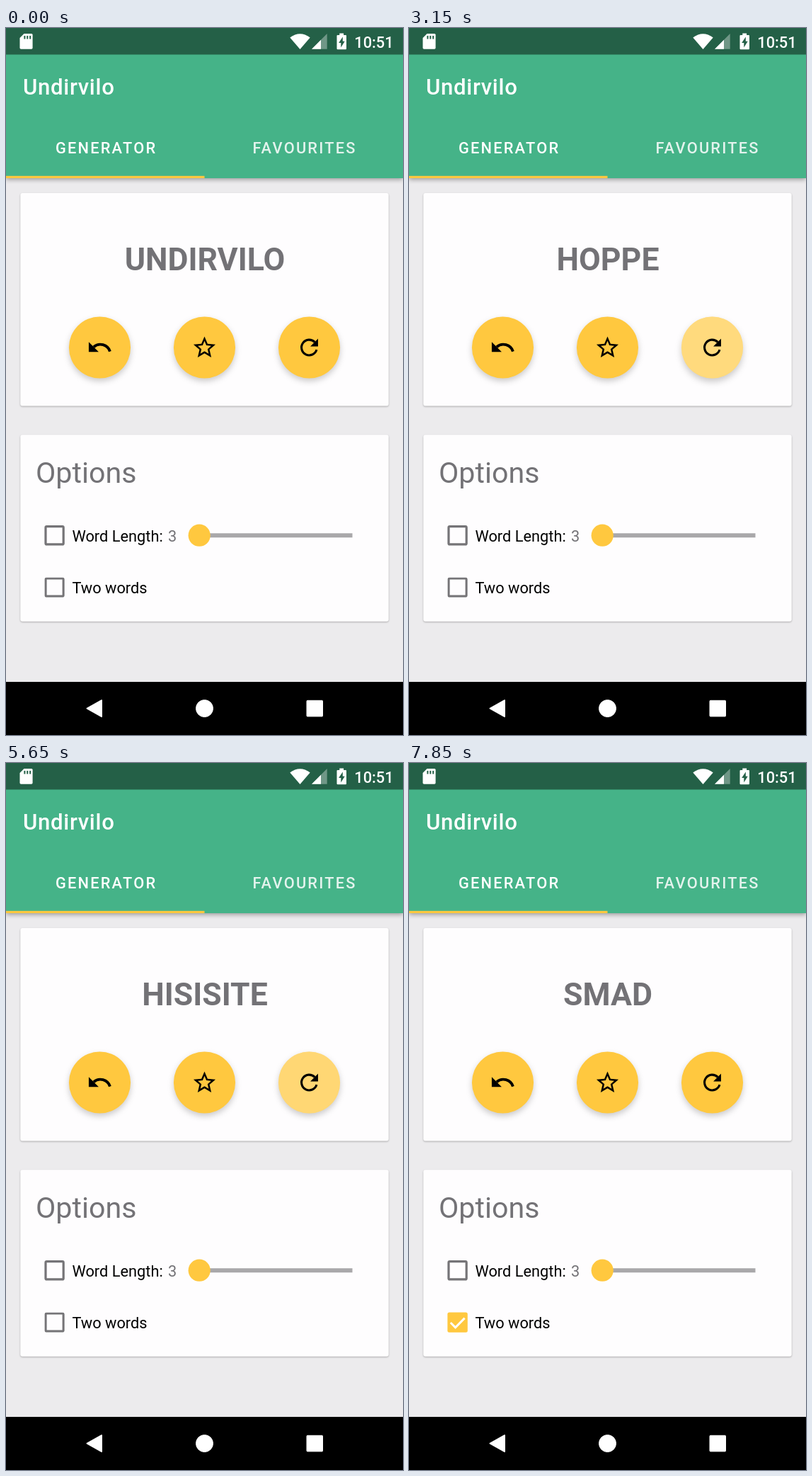
Animation, 561 px wide and 998 px high, one loop 8000 ms. Source, as an HTML page:

```html
<!DOCTYPE html>
<html lang="en">
<head>
<meta charset="utf-8">
<title>Word generator</title>
<style>
  html, body { margin: 0; width: 100%; height: 100%; overflow: hidden; background: #ecebed; }
  svg { display: block; width: 561px; height: 998px; font-family: Roboto, sans-serif; }
  .card { fill: #fefdfe; filter: drop-shadow(0 1.5px 1.2px rgba(0,0,0,.28)); }
  .bar { filter: drop-shadow(0 2px 3px rgba(0,0,0,.35)); }
  .tab { font-size: 21.8px; font-weight: 500; letter-spacing: 2.2px; text-anchor: middle; fill: #fff; }
  .label { font-size: 21.8px; }
  .fab { fill: #ffc83f; filter: drop-shadow(0 4px 4px rgba(0,0,0,.2)); }
  .line { fill: none; stroke: #000; stroke-width: 2.5; }
  .box { fill: none; stroke: #757477; stroke-width: 3.2; }
</style>
</head>
<body>
<svg viewBox="0 0 561 998">
  <defs>
    <clipPath id="disc"><circle cx="428.5" cy="451" r="43.6"/></clipPath>
    <clipPath id="tick-box"><rect x="54.4" y="775.4" width="28.4" height="28.4" rx="2.5"/></clipPath>
  </defs>
  <rect width="561" height="998" fill="#ecebed"/>

  <!-- app bar and tabs -->
  <rect class="bar" width="561" height="212" fill="#45b388"/>
  <rect width="561" height="37.5" fill="#246047"/>
  <text x="24" y="93.5" font-size="31.2" font-weight="500" letter-spacing=".65" fill="#fff">Undirvilo</text>
  <text class="tab" x="141.6" y="177">GENERATOR</text>
  <text class="tab" x="422" y="177" opacity=".85">FAVOURITES</text>
  <rect y="208.8" width="280.5" height="3.2" fill="#ffc83f"/>

  <!-- status icons -->
  <g fill="#fff">
    <path d="M25.5 8H36q1.6 0 1.6 1.6V28q0 1.8-1.6 1.8H21.2q-1.7 0-1.7-1.8V14z"/>
    <path d="M26.4 11v4.5M30.3 11v4.5M34.2 11v4.5" stroke="#246047" stroke-width="2"/>
    <path d="M401.3 13.4Q415.5 3 429.7 13.4L415.5 30z"/>
    <path d="M432 29.8h21.7V8z" opacity=".35"/>
    <path d="M432 29.8h13V16.7z"/>
    <path d="M471.3 7.5h5.8V10H480q1 0 1 1V29q0 1.2-1 1.2H468.6q-1.1 0-1.1-1.2V11q0-1 1.1-1h2.7z"/>
    <path d="M475.8 12.5l-5.6 8.5h3.1v6.5l5.4-8.8h-2.9z" fill="#246047"/>
    <text class="label" x="492.3" y="27.5" font-weight="500">10:51</text>
  </g>

  <!-- word card -->
  <rect class="card" x="20.3" y="233" width="520.4" height="300.5" rx="3"/>
  <text id="word" x="281" y="342" font-size="44.6" font-weight="700" text-anchor="middle" fill="#737276"></text>
  <circle class="fab" cx="132.5" cy="451" r="43.6"/>
  <circle class="fab" cx="280.5" cy="451" r="43.6"/>
  <circle class="fab" id="refresh" cx="428.5" cy="451" r="43.6"/>
  <circle id="ripple" cx="428.5" fill="#fff" clip-path="url(#disc)"/>
  <g transform="translate(113.8 432.3) scale(1.558)">
    <path d="M2 7v9h9z"/>
    <path class="line" d="M6.49 11.47A9.25 9.25 0 0 1 21.28 15.6"/>
  </g>
  <path transform="translate(261.8 432.3) scale(1.558)" d="M22 9.24l-7.19-.62L12 2 9.19 8.63 2 9.24l5.46 4.73L5.82 21 12 17.27 18.18 21l-1.63-7.03zM12 15.4l-3.76 2.27 1-4.28-3.32-2.88 4.38-.38L12 6.1l1.71 4.04 4.38.38-3.32 2.88 1 4.28z"/>
  <g transform="translate(409.8 432.3) scale(1.558)">
    <path d="M20 4v7h-7z"/>
    <path class="line" style="stroke-width:2" d="M18.7 14A7 7 0 1 1 16.95 7.05"/>
  </g>

  <!-- options card -->
  <rect class="card" x="20.3" y="574.3" width="520.4" height="263.5" rx="3"/>
  <text x="42" y="641.5" font-size="41.2" fill="#737276">Options</text>
  <rect class="box" x="56" y="703.7" width="25.2" height="25.2" rx="1.5"/>
  <text class="label" x="93.4" y="724.6">Word Length:</text>
  <text class="label" x="229" y="724.6" fill="#737276">3</text>
  <path d="M273 716.2H489.5" stroke="#a9a8aa" stroke-width="6"/>
  <circle cx="273.2" cy="716.2" r="15.6" fill="#ffc83f"/>
  <circle id="halo" cx="68.6" cy="789.6" fill="#ffc83f"/>
  <g clip-path="url(#tick-box)">
    <rect class="box" id="check" x="56" y="777" width="25.2" height="25.2" rx="1.5"/>
  </g>
  <path id="tick" d="M58.8 790l6.8 6.8L78.6 783.6" pathLength="1" stroke-dasharray="1 2" fill="none" stroke="#fff" stroke-width="3"/>
  <text class="label" x="93.4" y="797.8">Two words</text>

  <!-- navigation bar -->
  <rect y="923" width="561" height="75" fill="#000"/>
  <g fill="#fff" stroke="#fff" stroke-linejoin="round">
    <path d="M114.5 960.5l20.5-11.5v23z" stroke-width="2"/>
    <circle cx="280.5" cy="960.5" r="12"/>
    <rect x="425" y="949.3" width="22.5" height="22.5" rx="1"/>
  </g>
</svg>
<script>
const LOOP = 8000, CHECK_AT = 7320;
// start, new word, height of the touch point
const presses = [
  [500, "PELUNT", 451],
  [1660, "VALMOUS", 451],
  [2860, "HOPPE", 451],
  [3860, "ASSUR", 451],
  [4710, "TORBEL", 451],
  [5310, "HISISITE", 451],
  [6200, "SMAD", 468]
];
const $ = id => document.getElementById(id);
const clamp = v => Math.max(0, Math.min(1, v));
const set = (id, attrs) => {
  for (const name in attrs) $(id).setAttribute(name, attrs[name]);
};

function draw(t) {
  const [start, word, y] = presses.findLast(p => p[0] <= t) || [-LOOP, "UNDIRVILO", 451];
  const age = t - start;
  if ($("word").textContent !== word) $("word").textContent = word;
  set("ripple", {
    cy: y,
    r: 64 * clamp((age + 20) / 190),
    opacity: 0.46 * clamp((640 - age) / 500)
  });
  const lift = clamp(age / 100) * clamp((400 - age) / 200);
  $("refresh").style.filter = `drop-shadow(0 ${4 + 2 * lift}px ${4 + lift}px rgba(0,0,0,.2))`;

  const since = t - CHECK_AT;
  const on = since >= 0;
  set("halo", {
    r: on ? 30 * clamp((since + 20) / 170) : 0,
    opacity: 0.26 * clamp((530 - since) / 330)
  });
  set("check", {
    style: on ? `stroke:#ffc83f;stroke-width:${3.2 + 23 * clamp(since / 130)}` : ""
  });
  const drawn = clamp((since - 110) / 150);
  set("tick", { "stroke-dashoffset": 1 - drawn, opacity: drawn > 0 ? 1 : 0 });
}

const begin = performance.now();
function tick() {
  draw((performance.now() - begin) % LOOP);
  requestAnimationFrame(tick);
}
tick();
</script>
</body>
</html>
```
